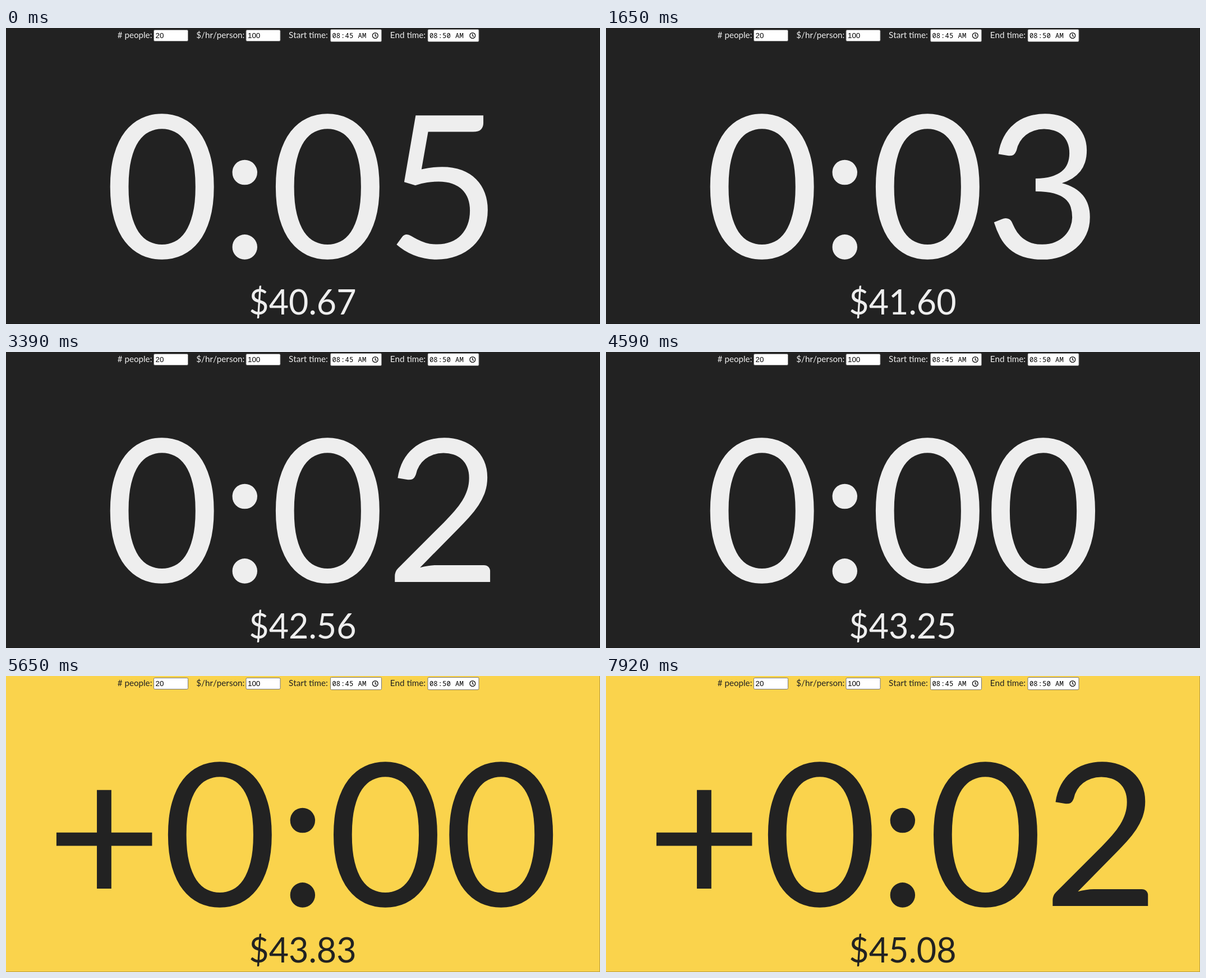
Write an HTML page that moves like this. It is 1059 px wide and 529 px high and loops after 7990 ms.

```html
<!DOCTYPE html>
<html lang="en">
<head>
<meta charset="utf-8">
<title>Meeting cost timer</title>
<style>
  html, body { margin: 0; width: 100%; height: 100%; overflow: hidden; }
  svg { display: block; width: 1059px; height: 529px; background: #222; fill: #eee; font: 15.2px Lato, sans-serif; font-kerning: none; }
  svg.over { background: #fad34c; fill: #222; }
  #clock, #cost { text-anchor: middle; }
  #clock { font-size: 355.6px; }
  #cost { font-size: 61px; }
  .box { fill: #fff; stroke: #767676; }
  .value { fill: #000; font: 13.33px "Liberation Sans", Arial, sans-serif; }
  .time { fill: #000; font: 12.2px "Noto Sans Mono", monospace; }
  .icon { fill: none; stroke: #000; stroke-width: 1.2; }
  .edge { fill: none; stroke: #000; stroke-opacity: .25; }
</style>
</head>
<body>
<svg id="stage" viewBox="0 0 1059 529">
  <g id="form"></g>
  <text id="clock" x="528.9" y="411"></text>
  <text id="cost" x="528.9" y="512.3"></text>
  <path class="edge" d="M1058.5 0V528.5H0"/>
</svg>
<script>
const LOOP = 7990, STEP = 66.58, FIRST_TICK = 560;
// [step, dollars] readings of the running cost
const COSTS = [[0, 40.67], [16, 41.28], [36, 42], [51, 42.56], [69, 43.25], [85, 43.83], [119, 45.08]];
const $ = id => document.getElementById(id);

const text = (x, y, s, cls = "") => `<text class="${cls}" x="${x}" y="${y}">${s}</text>`;
const box = (x, y, w, h) => `<rect class="box" x="${x + .5}" y="${y + .5}" width="${w - 1}" height="${h - 1}" rx="2"/>`;

const numberField = (x, value) => box(x, 3, 62, 21) + text(x + 3.5, 17.5, value, "value");

const timeField = (x, hour, minute) => box(x, 2, 92, 23)
  + text(x + 3.5, 18, hour, "time")
  + text(x + 18.9, 18, ":", "time")
  + text(x + 26.6, 18, minute, "time")
  + text(x + 49.6, 18, "AM", "time")
  + `<g class="icon" transform="translate(${x + 80.3} 13.5)"><circle r="4.9"/><path d="M0-3.2V.3L2.3 1.8"/></g>`;

$("form").innerHTML =
  text(198.7, 17.5, "# people:") + numberField(263, 20) +
  text(339.3, 17.5, "$/hr/person:") + numberField(427.5, 100) +
  text(504, 18, "Start time:") + timeField(578, "08", "45") +
  text(684.8, 18, "End time:") + timeField(751.5, "08", "50");

function costAt(step) {
  const i = Math.max(1, COSTS.findIndex(c => c[0] >= step));
  const [s0, v0] = COSTS[i - 1], [s1, v1] = COSTS[i];
  return v0 + (v1 - v0) * (step - s0) / (s1 - s0);
}

function draw(t) {
  const step = Math.min(119, Math.floor((t + 16) / STEP));
  const ticks = Math.floor((step * STEP - FIRST_TICK) / 1000) + 1;
  const over = ticks > 5;
  $("stage").classList.toggle("over", over);
  $("clock").textContent = over ? "+0:0" + (ticks - 6) : "0:0" + (5 - ticks);
  $("cost").textContent = "$" + costAt(step).toFixed(2);
}

const start = performance.now();
function frame() {
  draw((performance.now() - start) % LOOP);
  requestAnimationFrame(frame);
}
frame();
</script>
</body>
</html>
```
